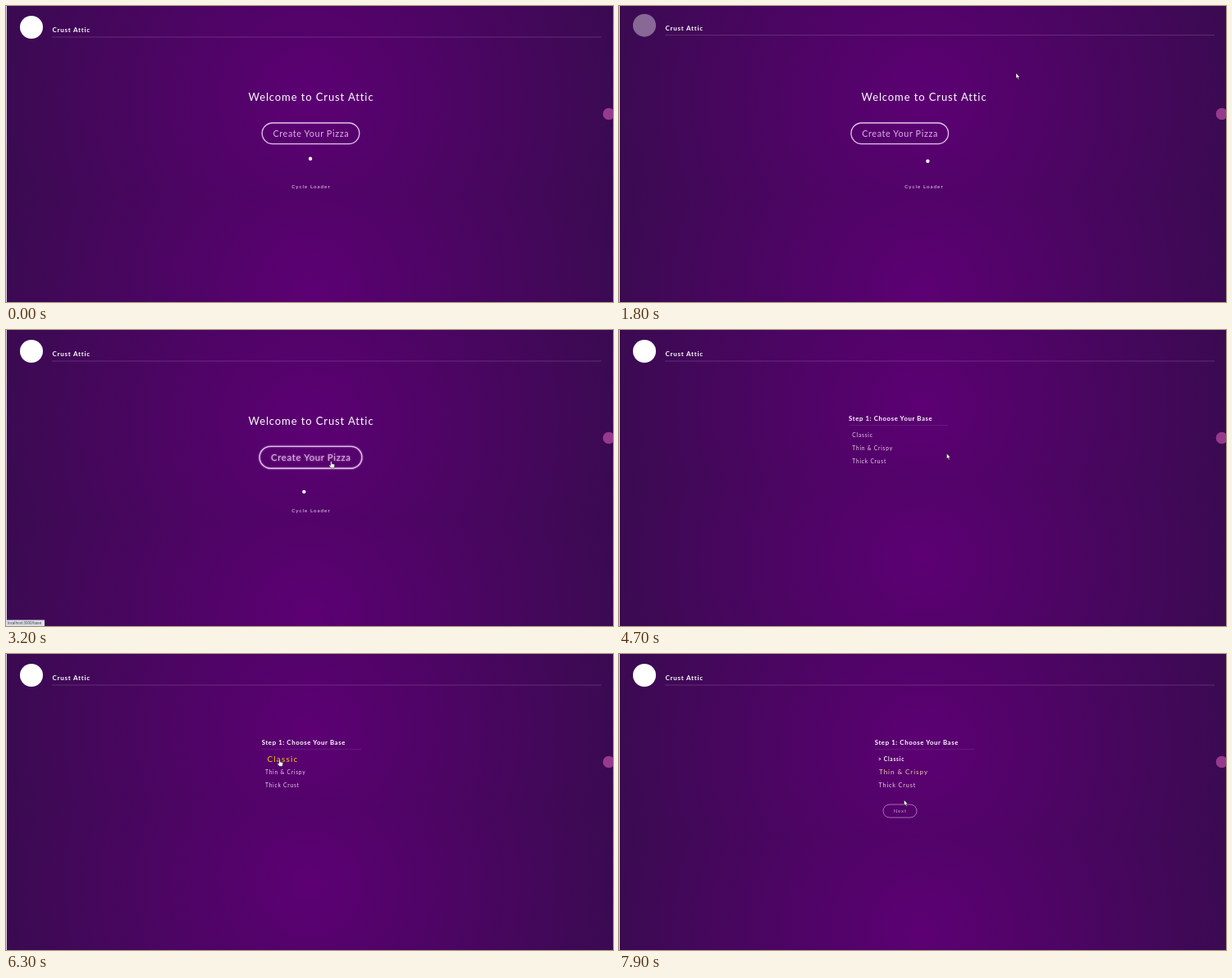
Animation of 740x362 px, one loop 8 s. Source, as an HTML page:

```html
<!DOCTYPE html>
<html lang="en">
<head>
<meta charset="utf-8">
<title>Pizza order</title>
<style>
  html, body { margin: 0; width: 100%; height: 100%; overflow: hidden; }
  body { background: #44055c; }
  #stage {
    position: absolute; left: 0; top: 0; width: 740px; height: 362px; overflow: hidden;
    background-image: radial-gradient(circle, #5c0073, #3a0a51);
    background-repeat: repeat;
  }
  svg { display: block; }
  text { font-family: Lato, "Open Sans", sans-serif; fill: #fff; white-space: pre; }
  .name { font-size: 8px; font-weight: 700; letter-spacing: .75px; }
  .title { font-size: 13px; letter-spacing: .9px; text-anchor: middle; }
  .cta { font-size: 10.8px; letter-spacing: .62px; fill: #dcb2e6; text-anchor: middle; }
  .small { font-size: 6.2px; letter-spacing: 1.04px; fill: #ead8ef; text-anchor: middle; }
  .step { font-size: 7.8px; font-weight: 700; letter-spacing: .6px; }
  .item { font-size: 6.6px; letter-spacing: .8px; }
  .next { font-size: 6.2px; letter-spacing: .8px; fill: #c596d2; text-anchor: middle; }
  .url { font: 4.4px "Open Sans", sans-serif; fill: #33363c; }
  .pill { fill: none; stroke: #e6c3ee; }
  .rule { stroke: #fff; stroke-width: .8; }
</style>
</head>
<body>
<div id="stage">
  <svg width="740" height="362" viewBox="0 0 740 362">
    <g id="header">
      <circle id="badge" cx="31" cy="26" r="14" fill="#fff"/>
      <text class="name" x="56.5" y="32">Crust Attic</text>
      <line class="rule" x1="56" y1="38" x2="726" y2="38" opacity=".2"/>
    </g>

    <g id="home">
      <text class="title" x="372" y="116">Welcome to Crust Attic</text>
      <g id="create">
        <rect class="pill" x="312.2" y="143" width="118.6" height="25.6" rx="12.8" stroke-width="1.3"/>
        <text class="cta" x="371.8" y="159.7">Create Your Pizza</text>
      </g>
      <circle id="ball" r="2.2" fill="#fff"/>
      <text class="small" x="372" y="222.7">Cycle Loader</text>
    </g>

    <g id="base">
      <text class="step" x="311.7" y="110.8">Step 1: Choose Your Base</text>
      <line class="rule" x1="312" y1="116.5" x2="433" y2="116.5" opacity=".11"/>
      <g id="items"></g>
      <g id="next">
        <rect class="pill" x="322.8" y="184" width="41" height="16" rx="8" stroke-width=".8" opacity=".7"/>
        <text class="next" x="343.6" y="194.3">Next</text>
      </g>
    </g>

    <circle cx="735" cy="132" r="7.3" fill="#963a8c"/>
    <g id="status">
      <rect y="354.6" width="47" height="8" fill="#dcdfe6"/>
      <text class="url" x="2" y="360.3">localhost:3000/base</text>
    </g>
    <rect width="1" height="362" fill="#e4d8e9"/>

    <g id="cursor" stroke="#1c1024" fill="#fff" stroke-width=".5" stroke-linejoin="round">
      <path id="arrow" d="M0 0V6.6L1.5 5.3L2.6 7.7L3.7 7.2L2.6 4.9H4.7Z"/>
      <path id="hand" d="M-.8 .7Q0 -.5 .8 .7V3L3.6 3.7Q4.4 4 4.2 5L3.5 8.3H-.5L-2.6 5.2Q-2.6 4.1 -1.6 4.5L-.8 5.2Z"/>
    </g>
  </svg>
</div>
<script>
const LOOP = 8000, WIDTH = 740, RATE = .0017;   // RATE: spring seconds per ms
const RELOAD = 1300, HOVER = 3110, LEAVE = 3600, SLIDE = 4415, PICK = 7090;
const $ = id => document.getElementById(id);

const items = [
  { label: "Classic", y: 131, on: 5400, off: 7600 },
  { label: "Thin & Crispy", y: 146.8, on: 7700, off: 7863 },
  { label: "Thick Crust", y: 162.5, on: 7863, off: 7873 }
];
for (const it of items) {
  it.el = document.createElementNS("http://www.w3.org/2000/svg", "text");
  it.el.setAttribute("class", "item");
  $("items").append(it.el);
}

const cursorPath = [
  [1450, 420, 12], [1750, 484, 82], [2150, 484, 82], [3100, 396.5, 160.5], [4450, 396.5, 160.5],
  [4650, 399.5, 151], [5100, 398, 149], [5450, 333.5, 129], [6400, 333.5, 129], [6900, 337, 129.5],
  [7560, 337, 131], [7720, 340, 143], [7863, 344, 162], [7890, 347.5, 178.5]
];

const clamp = v => Math.min(1, Math.max(0, v));
const smooth = p => p * p * (3 - 2 * p);
const tri = p => { p = ((p % 2) + 2) % 2; return p > 1 ? 2 - p : p; };
const move = (el, x, y) => el.setAttribute("transform", `translate(${x} ${y})`);
const show = (el, on) => { el.style.display = on ? "" : "none"; };

// Remaining distance (1 to 0) of a spring with damping 10 and mass 1
function spring(ms, stiffness = 120) {
  if (ms <= 0) return 1;
  const t = ms * RATE, w = Math.sqrt(stiffness - 25);
  return Math.exp(-5 * t) * (Math.cos(w * t) + 5 / w * Math.sin(w * t));
}

function along(path, t) {
  let i = 0;
  while (i < path.length - 2 && t > path[i + 1][0]) i++;
  const [a, b] = [path[i], path[i + 1]];
  const p = smooth(clamp((t - a[0]) / (b[0] - a[0])));
  return [a[1] + (b[1] - a[1]) * p, a[2] + (b[2] - a[2]) * p];
}

function drawHome(t) {
  show($("home"), t < RELOAD || (t >= RELOAD + 90 && t < LEAVE));
  const enter = t < RELOAD ? 0 : spring(t - RELOAD - 115);
  move($("header"), 0, -60 * enter);
  $("badge").setAttribute("opacity", t < RELOAD ? 1 : smooth(clamp((t - RELOAD) * RATE / 2)));

  const grow = t < HOVER ? 1 : 1 + .1 * smooth(tri((t - HOVER) / 176));
  $("create").setAttribute("transform",
    `translate(${371.5 - WIDTH * enter} 155.8) scale(${grow}) translate(-371.5 -155.8)`);
  $("create").style.filter = t >= HOVER ? "drop-shadow(0 0 1px rgba(255,255,255,.5))" : "";

  const phase = t < RELOAD ? Math.min(t, 882) * RATE + .25 : (t - 3200) * RATE;
  const up = 1 - (1 - tri(phase * 4)) ** 2;
  move($("ball"), 371 + 7.7 * (2 * smooth(tri(phase * 2)) - 1), 198 - 11.3 * up);
}

function drawBase(t) {
  show($("base"), t >= LEAVE);
  move($("base"), WIDTH * spring(t - SLIDE), 0);
  items.forEach((it, i) => {
    const hot = spring(t - it.off, 300) - spring(t - it.on, 300);
    const tint = clamp(hot) * (.6 + .4 * clamp((t - it.on - 100) / 200));
    const picked = i === 0 && t >= PICK;
    it.el.textContent = (picked ? "> " : "") + it.label;
    it.el.style.fontWeight = picked ? 700 : 400;
    const from = picked ? [255, 255, 255] : [232, 208, 238];
    const rgb = [250, 200, 24].map((c, k) => Math.round(from[k] + (c - from[k]) * tint));
    it.el.style.fill = `rgb(${rgb})`;
    const mid = it.y - 2.3;
    it.el.setAttribute("transform", `translate(311 ${mid}) scale(${1 + .5 * hot}) translate(5 2.3)`);
  });
  show($("next"), t >= PICK);
  move($("next"), -WIDTH * spring(t - PICK), 0);
}

function drawPointer(t) {
  const hand = (t >= HOVER && t < LEAVE) || (t >= 5400 && t < 7873);
  show($("cursor"), t >= cursorPath[0][0]);
  show($("hand"), hand);
  show($("arrow"), !hand);
  move($("cursor"), ...along(cursorPath, t));
  $("status").setAttribute("opacity", t < HOVER ? 0 : 1 - clamp((t - 3720) / 270));
}

function draw(t) {
  const tile = t < LEAVE ? 232 : t < PICK ? 187 : 224;
  $("stage").style.backgroundSize = `${WIDTH}px ${tile}px`;
  drawHome(t);
  drawBase(t);
  drawPointer(t);
}

const start = performance.now();
function tick() {
  draw((performance.now() - start) % LOOP);
  requestAnimationFrame(tick);
}
tick();
</script>
</body>
</html>
```
